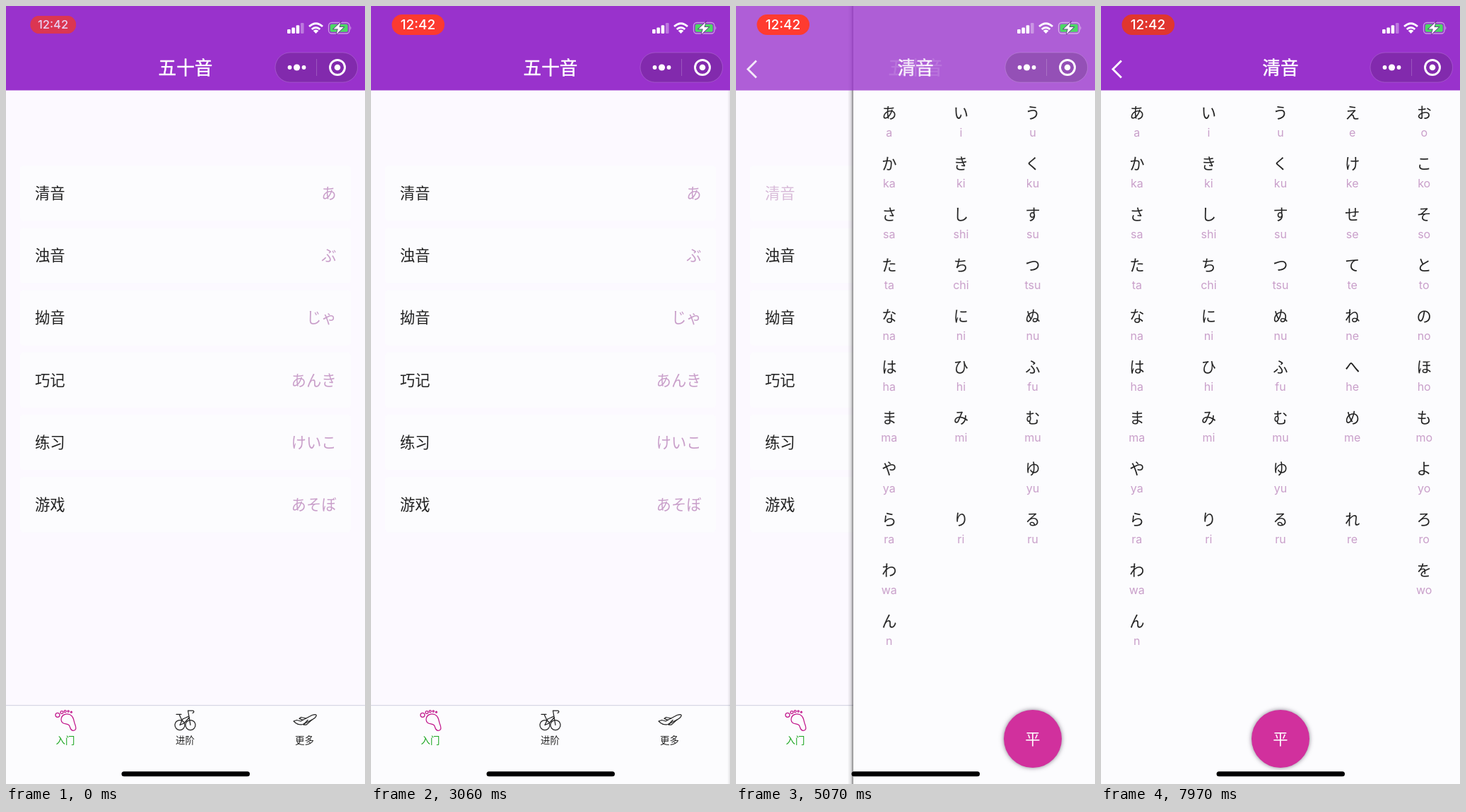
Recreate the animation shown at these times as an HTML page. Size 508 by 1102 pixels, loop 7.99 s.

```html
<!DOCTYPE html>
<html lang="zh-CN">
<head>
<meta charset="utf-8">
<title>五十音</title>
<style>
  html, body { margin: 0; width: 100%; height: 100%; overflow: hidden; background: #fcfcfe; }
  svg { display: block; width: 100%; height: 100%; }
  text { font-family: "Noto Sans CJK SC", "Noto Sans CJK JP", sans-serif; fill: #222; }
  .mid { text-anchor: middle; }
  .item { font-size: 21.3px; }
  .kana { font-family: "Noto Sans CJK JP", "Noto Sans CJK SC", sans-serif; font-size: 21.3px; }
  .hint { fill: #c99fca; text-anchor: end; }
  .roman { font: 400 16px Inter, sans-serif; fill: #c99fca; }
  .title { font-size: 25.6px; fill: #fff; stroke: #fff; stroke-width: .5; }
  .tab { font-size: 13.4px; font-weight: 500; }
  .icon { fill: none; stroke: #222; stroke-width: 1.25; stroke-linejoin: round; stroke-linecap: round; }
  .clock { font: 500 19px Inter, sans-serif; fill: #fff; }
  .button { filter: drop-shadow(0 0 3px rgba(20, 0, 30, .5)); }

  .page, .old, .new, .pill, .pulse, .pressed { animation: 7.99s linear infinite; }
  .page { animation-name: slide; }
  .old { animation-name: fade-out; }
  .new { animation-name: fade-in; }
  .pressed { animation-name: press; animation-timing-function: step-end; }
  .pill { animation-name: appear; transform-origin: 67px 26.5px; }
  .pulse { animation-name: pulse; animation-timing-function: ease-in-out; }

  /* page push: 4.739 s to 5.289 s */
  @keyframes slide {
    0% { transform: translateX(520px); }
    59.31% { transform: translateX(508px); animation-timing-function: ease-in-out; }
    66.2%, 100% { transform: translateX(0); }
  }
  @keyframes fade-out {
    0%, 59.31% { opacity: 1; animation-timing-function: ease-in-out; }
    66.2%, 100% { opacity: 0; }
  }
  @keyframes fade-in {
    0%, 59.31% { opacity: 0; animation-timing-function: ease-in-out; }
    66.2%, 100% { opacity: 1; }
  }
  @keyframes press {
    0% { fill: #222; }
    57.6%, 100% { fill: #d8bbd9; }
  }
  @keyframes appear {
    0% { transform: scale(.87); opacity: .78; animation-timing-function: ease-out; }
    4%, 100% { transform: none; opacity: 1; }
  }
  @keyframes pulse {
    0% { fill: #ee3830; }
    6.5%, 35.3%, 64.1%, 92.9% { fill: #ff3b30; }
    20.9%, 49.7%, 78.5% { fill: #d8342f; }
    100% { fill: #e0362f; }
  }
</style>
</head>
<body>
<svg viewBox="0 0 508 1102" preserveAspectRatio="none">
  <defs>
    <linearGradient id="edge">
      <stop offset="0" stop-color="#000" stop-opacity="0"/>
      <stop offset=".6" stop-color="#000" stop-opacity=".12"/>
      <stop offset="1" stop-color="#000" stop-opacity=".5"/>
    </linearGradient>
  </defs>

  <rect width="508" height="1102" fill="#fcf9ff"/>
  <g id="list"></g>

  <g id="tabs">
    <rect y="990" width="508" height="112" fill="#fcfcfe"/>
    <rect y="990" width="508" height="1.2" fill="#d6d5e4"/>
    <g class="icon" style="stroke:#c2188c">
      <circle cx="73" cy="1004.3" r="3"/>
      <circle cx="79" cy="1000.4" r="1.9"/>
      <circle cx="83.7" cy="999" r="1.5"/>
      <circle cx="88.2" cy="999" r="1.2"/>
      <circle cx="92.4" cy="1000.2" r="1"/>
      <path d="M78 1011C78 1004 85 1001.5 90 1003.5C96.5 1006 95.5 1013 97.8 1018C100 1024 98.5 1026.8 94.5 1026.3C90 1025.5 91.5 1021 89 1018.5C86 1016 78.5 1018 78 1011Z"/>
    </g>
    <g class="icon">
      <circle cx="246" cy="1018.5" r="7"/>
      <circle cx="261" cy="1018.5" r="7"/>
      <path d="M241 1003.3H248M245 1003.3L249 1012M246 1018.5L250 1010L259 1006M246 1018.5L252 1016L259.5 1007.5M261 1018.5L257.5 998H264C266.5 998 266.5 1001 264 1001.5"/>
    </g>
    <g class="icon">
      <path d="M407 1013L411.5 1011.5L417 1013L433 1004.5Q439 1002.5 439.2 1004.8Q438.5 1008 433 1011L420 1017.5Q413 1019.5 407 1013Z"/>
      <path d="M424.5 1009L417.5 1007.5L415 1009.3L420 1011.3M427 1011.5L421 1018L425 1018L433 1011"/>
    </g>
    <text class="tab mid" x="84" y="1045" style="fill:#17a41c">入门</text>
    <text class="tab mid" x="253.5" y="1045">进阶</text>
    <text class="tab mid" x="422.5" y="1045">更多</text>
  </g>

  <rect width="508" height="119.5" fill="#fff"/>
  <g class="page">
    <rect x="-8" width="8" height="1102" fill="url(#edge)"/>
    <rect width="508" height="1102" fill="#fcfcfe"/>
    <g id="grid"></g>
    <circle class="button" cx="254" cy="1038" r="41" fill="#d1309d"/>
    <text class="item mid" x="254" y="1045.5" style="fill:#fff">平</text>
  </g>

  <g class="old">
    <rect width="508" height="119.5" fill="#9932cc"/>
    <text class="title mid" x="254" y="96.5">五十音</text>
  </g>
  <g class="new">
    <rect width="508" height="119.5" fill="#9932cc"/>
    <text class="title mid" x="254" y="96.5">清音</text>
    <path d="M28.8 77.5L16.8 89.5L28.8 101.5" fill="none" stroke="#fff" stroke-width="2.8"/>
  </g>

  <g class="pill">
    <rect class="pulse" x="29.5" y="12" width="74.5" height="29" rx="14.5"/>
    <text class="clock mid" x="66.5" y="33.3">12:42</text>
  </g>

  <g fill="#fff">
    <rect x="398" y="33" width="4.6" height="6" rx="1.2"/>
    <rect x="404.3" y="30.5" width="4.6" height="8.5" rx="1.2"/>
    <rect x="410.6" y="27.3" width="4.6" height="11.7" rx="1.2"/>
    <rect x="416.9" y="24" width="4.6" height="15" rx="1.2" opacity=".35"/>
    <path d="M438.5 39L434.6 35Q438.5 32 442.4 35Z"/>
    <g fill="none" stroke="#fff" stroke-width="2.9">
      <path d="M432.7 33Q438.5 28 444.3 33"/>
      <path d="M429 29Q438.5 20.5 448 29"/>
    </g>
  </g>
  <g>
    <rect x="456.5" y="23.5" width="29.5" height="15.5" rx="4.5" fill="none" stroke="#fff" stroke-opacity=".5" stroke-width="1.3"/>
    <path d="M487.3 28.5Q489.5 31.2 487.3 34Z" fill="#fff" opacity=".5"/>
    <rect x="458.7" y="25.7" width="25" height="11.1" rx="2.6" fill="#4cd964"/>
    <path d="M473.5 23L463.5 32.5H469.8L467.5 40L477.8 30H471.5Z" fill="#fff" stroke="#5f2b86" stroke-width="1.5" paint-order="stroke"/>
  </g>

  <g>
    <rect x="381" y="66" width="116.5" height="42" rx="21" fill="#000" fill-opacity=".15" stroke="#fff" stroke-opacity=".17"/>
    <rect x="439" y="75" width="1" height="24" fill="#fff" opacity=".2"/>
    <g fill="#fff">
      <circle cx="401.5" cy="87" r="2.9"/>
      <circle cx="411.5" cy="87" r="4.6"/>
      <circle cx="421.5" cy="87" r="2.9"/>
      <circle cx="469" cy="87" r="4.3"/>
    </g>
    <circle cx="469" cy="87" r="10.5" fill="none" stroke="#fff" stroke-width="2.9"/>
  </g>

  <rect x="163.5" y="1084.3" width="181.5" height="7" rx="3.5"/>
</svg>

<script>
  const label = (cls, x, y, str) => `<text class="${cls}" x="${x}" y="${y}">${str}</text>`;

  const items = [["清音", "あ"], ["浊音", "ぶ"], ["拗音", "じゃ"],
                 ["巧记", "あんき"], ["练习", "けいこ"], ["游戏", "あそぼ"]];
  document.getElementById("list").innerHTML = items.map(([name, hint], i) => {
    const y = 265 + i * 88.2;
    return `<rect x="20" y="${y - 39}" width="468" height="78.5" rx="5" fill="#fcfcfe"/>` +
      label(i ? "item" : "item pressed", 41, y + 8, name) +
      label("kana hint", 467.5, y + 8, hint);
  }).join("");

  const rows = ["あいうえお", "かきくけこ", "さしすせそ", "たちつてと", "なにぬねの",
                "はひふへほ", "まみむめも", "や ゆ よ", "らりるれろ", "わ   を", "ん"];
  const heads = ["", "k", "s", "t", "n", "h", "m", "y", "r", "w"];
  const special = { si: "shi", ti: "chi", tu: "tsu", hu: "fu" };
  const roman = (r, c) => {
    if (r === 10) return "n";
    const key = heads[r] + "aiueo"[c];
    return special[key] || key;
  };
  document.getElementById("grid").innerHTML = rows.map((row, r) =>
    [...row].map((kana, c) => {
      if (kana === " ") return "";
      const x = 50.8 + c * 101.6, y = 151 + r * 72;
      return label("kana mid", x, y + 8, kana) + label("roman mid", x, y + 34, roman(r, c));
    }).join("")).join("");
</script>
</body>
</html>
```
